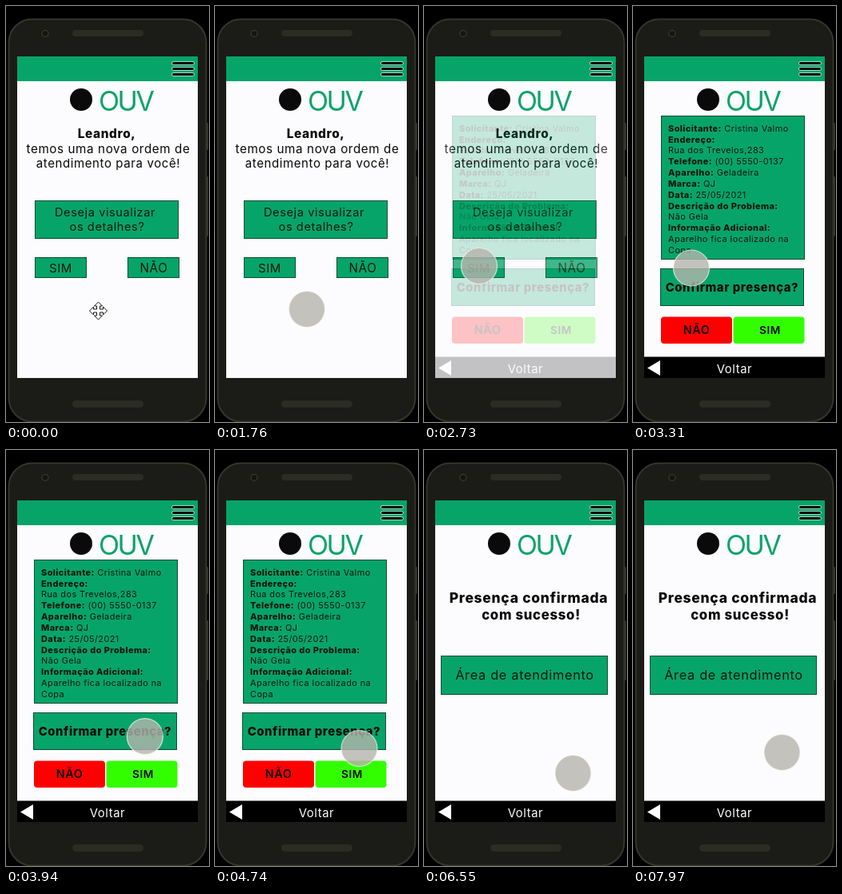
Animation, 254 px wide and 520 px high, one loop 8000 ms. Source, as an HTML page:

```html
<!DOCTYPE html>
<html lang="pt-BR">
<head>
<meta charset="utf-8">
<title>Ordem de atendimento</title>
<style>
  html, body { margin: 0; width: 100%; height: 100%; overflow: hidden; background: #000; }
  svg { display: block; width: 100%; height: 100%; }
  text { font-family: Inter, "Open Sans", sans-serif; letter-spacing: .04em; fill: #080808; white-space: pre; }
  .mid { text-anchor: middle; }
  .bold { font-weight: 800; }
  .card { fill: #07a469; stroke: #0a4a34; stroke-width: 1; }
  .ink { fill: #05180f; }
  .paper { fill: #fcfcfe; }
</style>
</head>
<body>
<svg viewBox="0 0 254 520" preserveAspectRatio="none">
  <rect width="254" height="520"/>
  <g id="phone">
    <rect x="248" y="146" width="5" height="34" rx="1" fill="#35352a"/>
    <rect x="248" y="213" width="5" height="75" rx="1" fill="#35352a"/>
    <rect x="3.5" y="16.5" width="247" height="503" rx="29" fill="#1b1b17" stroke="#35352a" stroke-width="2"/>
    <circle cx="49" cy="34.5" r="4" fill="#141412" stroke="#35352a" stroke-width="1.5"/>
    <rect x="83" y="30" width="89" height="8" rx="4" fill="#2c2c26"/>
    <rect x="83" y="493" width="89" height="9" rx="4.5" fill="#2c2c26"/>
  </g>
  <rect class="paper" x="14" y="63" width="226" height="402"/>

  <g id="ask">
    <text class="mid bold" x="126" y="165" font-size="15.4">Leandro,</text>
    <text class="mid" x="128" y="183.5" font-size="15.2">temos uma nova ordem de</text>
    <text class="mid" x="128" y="202" font-size="15">atendimento para você!</text>
    <rect class="card" x="36.5" y="243.5" width="179" height="47"/>
    <text class="mid ink" x="124" y="262.5" font-size="14.6">Deseja visualizar</text>
    <text class="mid ink" x="126.5" y="280.5" font-size="14.6">os detalhes?</text>
    <rect class="card" x="36.5" y="314.5" width="64" height="25"/>
    <text class="mid ink" x="68.5" y="332.5" font-size="15">SIM</text>
    <rect class="card" x="152.5" y="314.5" width="64" height="25"/>
    <text class="mid ink" x="185" y="332.5" font-size="15.3">NÃO</text>
  </g>

  <g id="details">
    <rect class="paper" x="14" y="94" width="226" height="371"/>
    <rect class="card" x="35.5" y="137.5" width="179" height="179"/>
    <g id="fields" font-size="10.9"></g>
    <rect class="card" x="34.5" y="328.5" width="179" height="46"/>
    <text class="mid bold" x="124" y="357" font-size="14.8">Confirmar presença?</text>
    <rect x="35" y="388.5" width="89" height="33.5" rx="4" fill="#fe0000"/>
    <text class="mid" x="79.5" y="410" font-size="14.4" font-weight="600">NÃO</text>
    <rect x="125.5" y="388.5" width="89" height="33.5" rx="4" fill="#33fe00"/>
    <text class="mid" x="171.5" y="410" font-size="13.6" font-weight="600">SIM</text>
    <use href="#back"/>
  </g>

  <g id="done">
    <rect class="paper" x="14" y="94" width="226" height="371"/>
    <text class="mid bold" x="131" y="191" font-size="17.5">Presença confirmada</text>
    <text class="mid bold" x="134" y="212" font-size="16.8">com sucesso!</text>
    <rect class="card" x="21.5" y="257.5" width="208" height="48"/>
    <text class="mid ink" x="126" y="287" font-size="16.4">Área de atendimento</text>
    <use href="#back"/>
  </g>

  <defs>
    <g id="back">
      <rect x="14" y="438.5" width="226" height="26.5"/>
      <path d="M18 452.5L34 443V462Z" fill="#fff"/>
      <text class="mid" x="127" y="458.5" font-size="14.8" style="fill:#fff">Voltar</text>
    </g>
  </defs>

  <g id="header">
    <rect x="14" y="63" width="226" height="31" fill="#07a469"/>
    <path d="M209.5 71.5h24M209.5 78.5h24M209.5 85.5h24" stroke="#cfeee2" stroke-width="4.6" stroke-linecap="round"/>
    <path d="M209.5 71.5h24M209.5 78.5h24M209.5 85.5h24" stroke="#000" stroke-width="3" stroke-linecap="round"/>
    <circle cx="94" cy="117" r="14" fill="#0a0a0a"/>
    <text x="116" y="130.5" font-size="34" style="fill:#0ca368;letter-spacing:-.07em">OUV</text>
  </g>

  <path id="move" fill="#fff" stroke="#111" stroke-width="1" stroke-linejoin="round"/>
  <circle id="touch" r="22.5" fill="rgba(182,181,172,.8)" stroke="rgba(244,244,234,.75)" stroke-width="1.2"/>
</svg>
<script>
const LOOP = 8000;
const el = id => document.getElementById(id);

// Label and value on each line of the order card
const fields = [
  ["Solicitante:", " Cristina Valmo"], ["Endereço:", ""], ["", "Rua dos Trevelos,283"],
  ["Telefone:", " (00) 5550-0137"], ["Aparelho:", " Geladeira"], ["Marca:", " QJ"],
  ["Data:", " 25/05/2021"], ["Descrição do Problema:", ""], ["", "Não Gela"],
  ["Informação Adicional:", ""], ["", "Aparelho fica localizado na"], ["", "Copa"]
];
el("fields").innerHTML = fields.map(([label, value], i) =>
  `<text class="ink" x="44" y="${156.8 + i * 13.83}"><tspan class="bold">${label}</tspan>${value}</text>`).join("");

// Four-way arrow: one arm turned through four quarter turns
const arm = [[-2, -2], [-2, -6], [-5, -6], [0, -11], [5, -6], [2, -6]];
const turn = ([x, y], n) => n ? turn([-y, x], n - 1) : [x, y];
el("move").setAttribute("d", "M" + [0, 1, 2, 3]
  .flatMap(n => arm.map(p => turn(p, n).join(" "))).join("L") + "Z");
el("move").setAttribute("transform", "translate(115.5 381)");

// Time, x, y of the touch point
const path = [
  [1760, 115, 379], [2440, 69, 325], [3270, 69, 325], [3310, 73, 327.5],
  [4110, 187, 362], [4450, 184, 376], [4700, 180.5, 373], [5830, 180.5, 373],
  [6190, 183, 402], [6550, 186.5, 404], [6630, 186, 409.5], [7680, 186, 409.5],
  [7970, 186.5, 378]
];
const clamp = v => Math.max(0, Math.min(1, v));
const ease = v => v * v * (3 - 2 * v);
const ramp = (t, from, to) => ease(clamp((t - from) / (to - from)));

function touchAt(t) {
  const i = path.findIndex(p => p[0] > t);
  if (i < 1) return (i ? path[path.length - 1] : path[0]).slice(1);
  const [a, b] = [path[i - 1], path[i]];
  const k = ramp(t, a[0], b[0]);
  return [a[1] + (b[1] - a[1]) * k, a[2] + (b[2] - a[2]) * k];
}

const show = (id, on) => el(id).setAttribute("visibility", on ? "visible" : "hidden");

function draw(t) {
  el("details").setAttribute("opacity", ramp(t, 2590, 3050));
  el("done").setAttribute("opacity", ramp(t, 6150, 6530));
  show("move", t < 130);
  show("touch", t >= 130 && !(t >= 2500 && t < 2640));
  const [x, y] = touchAt(t);
  el("touch").setAttribute("cx", x);
  el("touch").setAttribute("cy", y);
}

const start = performance.now();
function tick() {
  draw((performance.now() - start) % LOOP);
  requestAnimationFrame(tick);
}
tick();
</script>
</body>
</html>
```
